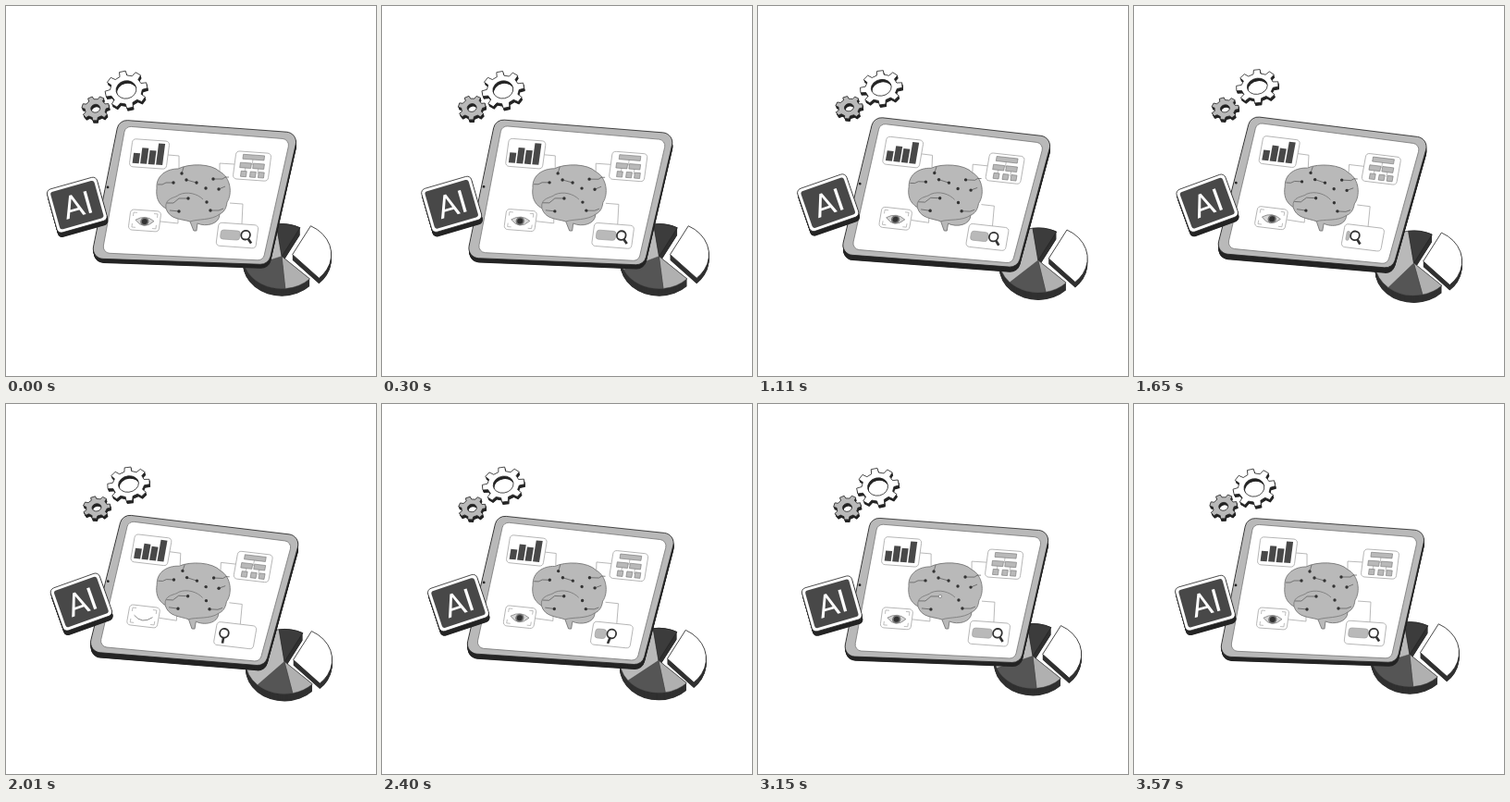
An HTML page with a canvas that plays this animation: 400x400 px, repeating every 3.6 s.

```html
<!DOCTYPE html>
<html lang="en">
<head>
<meta charset="utf-8">
<title>AI tablet</title>
<style>
html, body { margin: 0; width: 100%; height: 100%; overflow: hidden; background: #fff }
canvas { display: block; width: 400px; height: 400px }
</style>
</head>
<body>
<canvas id="stage" width="400" height="400"></canvas>
<script>
const ctx = document.getElementById('stage').getContext('2d');
const LOOP = 3600, RAD = Math.PI / 180;
const INK = '#222', SIDE = '#242424', DARK = '#484848', GREY = '#b9b9b9', LINE = '#a8a8a8';

// Cosine wave over one loop, highest at time `peak`
const wave = (t, peak) => Math.cos(2 * Math.PI * (t - peak) / LOOP);

// Eased value from a list of [time, value]
function keys(t, list) {
  for (let i = 1; i < list.length; i++) {
    const [t0, a] = list[i - 1], [t1, b] = list[i];
    if (t <= t1) {
      const k = (t - t0) / (t1 - t0);
      return a + (b - a) * k * k * (3 - 2 * k);
    }
  }
  return list[list.length - 1][1];
}

function group(draw, ...matrix) {
  ctx.save();
  ctx.transform(...matrix);
  draw();
  ctx.restore();
}

function shape(path, fill, stroke, width = 0.8) {
  if (fill) { ctx.fillStyle = fill; ctx.fill(path, 'evenodd'); }
  if (stroke) { ctx.strokeStyle = stroke; ctx.lineWidth = width; ctx.stroke(path); }
}

function slab(path, fill, dx, dy, side = SIDE) {
  const steps = Math.ceil(dy * 2);
  for (let i = steps; i > 0; i--) {
    group(() => shape(path, side), 1, 0, 0, 1, dx * i / steps, dy * i / steps);
  }
  shape(path, fill, INK);
}

function place(path, ...matrix) {
  const placed = new Path2D();
  placed.addPath(path, new DOMMatrix(matrix));
  return placed;
}

function quad(points, r) {
  const p = new Path2D(), n = points.length, [a, z] = [points[0], points[n - 1]];
  p.moveTo((a[0] + z[0]) / 2, (a[1] + z[1]) / 2);
  points.forEach((c, i) => p.arcTo(...c, ...points[(i + 1) % n], r));
  p.closePath();
  return p;
}

function box(x, y, w, h, r = 0) {
  const p = new Path2D();
  p.roundRect(x, y, w, h, r);
  return p;
}

function disc(x, y, r) {
  const p = new Path2D();
  p.arc(x, y, r, 0, 7);
  return p;
}

function gear(teeth, radius, root, hole) {
  const p = new Path2D(), step = 2 * Math.PI / teeth;
  for (let i = 0; i < teeth; i++) {
    for (const [at, r] of [[-0.29, root], [-0.19, radius], [0.19, radius], [0.29, root]]) {
      p.lineTo(r * Math.cos((i + at) * step), r * Math.sin((i + at) * step));
    }
  }
  p.closePath();
  p.moveTo(hole, 0);
  p.arc(0, 0, hole, 0, 7);
  return p;
}

function wedge(from, to) {
  const p = new Path2D();
  p.moveTo(0, 0);
  p.ellipse(0, 0, 42, 35, 0, from * RAD, to * RAD);
  p.closePath();
  return p;
}

const bigGear = gear(8, 23, 17.5, 11), smallGear = gear(7, 15, 11.5, 5);
const body = quad([[122, 123], [316, 137], [284, 279.5], [92, 273]], 11);
const screen = quad([[129, 130], [307, 144], [278, 275], [104, 267]], 7);
const tile = box(-28, -25, 56, 50, 5), tileFace = box(-24.5, -21.5, 49, 43, 3);
const brain = new Path2D(`M163 197C162 183 174 176 186 176C198 170 222 170 231 179
  C243 185 245 203 239 212C238 220 235 223 231 225C231 236 216 239 207 235L206 243H203
  L199 233C189 230 177 231 173 219C164 214 162 206 163 197Z`);
const folds = new Path2D(`M173 219C171 207 183 208 187 204C196 200 207 203 213 209
  M199 233C207 230 222 232 231 225`);
const traces = new Path2D(`M181 191H173L169 193H164M190 181L192 174M195 188L206 191
  M224 187H234L237 185H241M230 198L237 195M197 208H187L181 213H174
  M187 222L177 221M221 221H230L235 219`);
const links = new Path2D(`M175 161L187 162V175M247 171L231 170V179
  M167 233L186 235V229M242 213L256 214L255 236`);
const darkDots = [[190, 181], [224, 187], [217, 212], [221, 221], [187, 222]];
const flashDots = [[195, 188], [206, 191], [216, 197], [230, 198], [181, 191], [197, 208]];

function card(x, y, w, h, draw) {
  group(() => {
    shape(box(-w / 2, -h / 2, w, h, 4), '#fff', LINE);
    draw();
  }, 1, 0.07, -0.13, 1, x, y);
}

function bars() {
  [11, 17, 15, 23].forEach((h, i) => shape(box(-17 + i * 8.5, 11 - h, 7, h), DARK));
}

function tree() {
  shape(new Path2D('M0 -8V-1M-7 -1V8M7 -1V8'), null, LINE, 0.7);
  shape(box(-11, -12, 23, 5), GREY, '#777', 0.6);
  for (const x of [-13, 1]) shape(box(x, -3, 12, 5.5), GREY, '#777', 0.6);
  for (const x of [-11, -1, 8]) shape(box(x, 6, 6, 6), GREY, '#777', 0.6);
}

function eye(t) {
  const look = keys(t, [[0, 0], [250, 0], [550, -5], [800, -5], [1100, 0], [1400, 1], [1700, 1], [1850, 0]]);
  const open = keys(t, [[0, 1], [1780, 1], [1940, 0], [2080, 0], [2280, 1]]);
  shape(new Path2D('M-13 -4V-8H-9M9 -8H13V-4M13 4V8H9M-9 8H-13V4'), null, LINE, 0.7);
  const lid = 7 - 14 * open;
  const almond = new Path2D(`M-10 0Q0 ${lid} 10 0Q0 11 -10 0Z`);
  if (open < 0.05) return shape(new Path2D('M-10 0Q0 9 10 0'), null, '#777');
  shape(almond, '#d8d8d8', '#777', 0.7);
  ctx.save();
  ctx.clip(almond);
  shape(disc(look, 1, 4.6), '#777');
  shape(disc(look, 1, 3), '#333');
  ctx.restore();
}

function search(t) {
  const x = keys(t, [[0, 9], [900, 9], [1900, -12], [2060, -12], [2650, 7], [3200, 9]]);
  const turn = keys(t, [[0, 50], [1680, 50], [2010, 90], [2700, 112], [3200, 50]]) * RAD;
  const width = Math.max(0, x + 12);
  if (width > 0.5) shape(box(-18, -5, width, 10, Math.min(3, width / 2)), GREY, '#999', 0.6);
  const cos = Math.cos(turn), sin = Math.sin(turn), handle = new Path2D();
  handle.moveTo(x + 5 * cos, 5 * sin - 1);
  handle.lineTo(x + 11 * cos, 11 * sin - 1);
  shape(handle, null, '#333', 2.6);
  shape(disc(x, -1, 4.8), '#fff', '#333', 1.8);
}

function pie(t, swing) {
  const x = 300 + 3 * wave(t, 1300), y = 274.5 + 4 * wave(t, 1950);
  const gap = 10.8 + 1.3 * wave(t, 500);
  const first = 85 - 8 * swing, second = 160 - 29 * swing;
  group(() => {
    slab(wedge(44, 298), DARK, 0, 8, '#303030');
    shape(wedge(44, first), '#b0b0b0', DARK, 0.5);
    shape(wedge(first, second), '#555', DARK, 0.5);
    shape(wedge(second, 262), GREY, DARK, 0.5);
    shape(wedge(262, 298), '#3c3c3c', INK, 0.5);
    group(() => slab(wedge(-62, 47), '#fff', 0, 6, '#303030'), 1, 0, 0, 1, gap, -2);
  }, 1, 0, 0, 1, x, y);
}

function tablet(t, swing) {
  ctx.save();
  ctx.translate(203, 200);
  ctx.rotate(0.052 * swing);
  ctx.translate(-203, -200);
  slab(body, GREY, 0.5, 4.5 + 1.5 * swing);
  shape(screen, '#fff', '#777');
  shape(disc(110, 196, 1.4), INK);
  shape(links, null, LINE);
  card(155, 160, 40, 30, bars);
  card(266, 173, 38, 30, tree);
  card(150, 232, 33, 22, () => eye(t));
  card(250, 248, 43, 25, () => search(t));
  shape(brain, GREY, '#777', 0.9);
  shape(folds, null, '#777');
  shape(traces, null, '#555', 0.7);
  for (const [x, y] of darkDots) shape(disc(x, y, 1.7), '#333');
  flashDots.forEach(([x, y], i) => {
    const lit = t > 2460 + i * 40 && t < 2960 + i * 40;
    shape(disc(x, y, 1.7), lit ? '#fff' : '#333', lit && '#666', 0.6);
  });
  ctx.restore();
}

function aiTile(t, swing) {
  const x = 78.5 + 4 * wave(t, 2450), y = 214.3 + 1.6 * wave(t, 3000);
  const m = new DOMMatrix([1, 0, 0, 1, x, y]).rotate(-4.5 * swing)
    .multiply(new DOMMatrix([0.965, -0.27, 0.26, 0.94, 0, 0]));
  const matrix = [m.a, m.b, m.c, m.d, m.e, m.f];
  slab(place(tile, ...matrix), '#fff', 1, 5);
  group(() => {
    shape(tileFace, DARK);
    ctx.fillStyle = '#fff';
    ctx.font = '35px Roboto, sans-serif';
    ctx.textAlign = 'center';
    ctx.fillText('AI', 0.5, 12.5);
  }, ...matrix);
}

function gearAt(path, fill, x, y, turn, squash, dx, dy) {
  const m = new DOMMatrix([1, 0, 0, 1, x, y]).rotate(-12).scale(1, squash).rotate(turn);
  slab(place(path, m.a, m.b, m.c, m.d, m.e, m.f), fill, dx, dy);
}

function frame(now) {
  const t = now % LOOP, swing = (1 + wave(t, 1650)) / 2;
  ctx.fillStyle = '#fff';
  ctx.fillRect(0, 0, 400, 400);
  ctx.lineJoin = 'round';
  pie(t, swing);
  tablet(t, swing);
  aiTile(t, swing);
  const turn = 8 * swing;
  gearAt(smallGear, GREY, 97.5 + wave(t, 1400), 111 + 1.6 * wave(t, 2600), turn, 0.88 - 0.08 * swing, 1, 3);
  gearAt(bigGear, '#fff', 131.5 + 2 * wave(t, 1400), 88.5 + 2 * wave(t, 150), turn, 0.88 - 0.1 * swing, 1, 3);
  requestAnimationFrame(frame);
}
requestAnimationFrame(frame);
</script>
</body>
</html>
```
